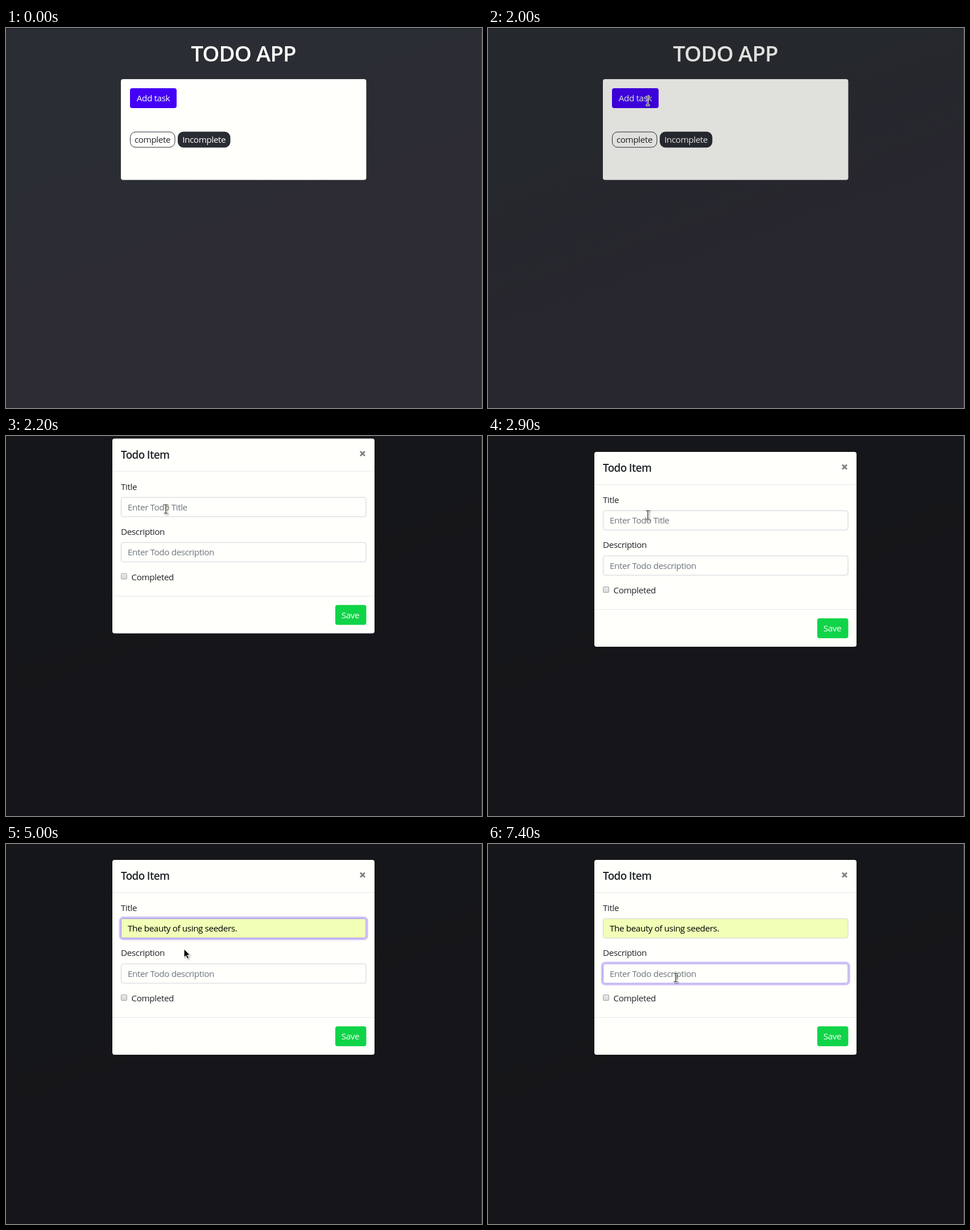
An HTML page that plays this animation: 837 by 669 pixels, repeating every 8000 ms.

```html
<!DOCTYPE html>
<html lang="en">
<head>
<meta charset="utf-8">
<title>Todo app</title>
<style>
  html, body { margin: 0; width: 100%; height: 100%; overflow: hidden; background: #2a2c33; }
  svg { display: block; width: 100%; height: 100%; }
  text { font: 400 15.3px "Open Sans", "Noto Sans", sans-serif; letter-spacing: -0.0275em; fill: #212529; white-space: pre; }
  .mid { text-anchor: middle; }
  .white { fill: #fffffb; }
  .hint { fill: #6c757d; }
  .value { fill: #000; }
  .h1 { font-size: 38.4px; font-weight: 600; letter-spacing: -0.025em; fill: #fffffb; }
  .h5 { font-size: 18.9px; font-weight: 600; letter-spacing: -0.035em; }
  .line { stroke: #e4e7ea; }
  .ring { fill: none; stroke: #4400f8; stroke-opacity: .25; stroke-width: 3.2; }
  .caret { fill: #000; }
</style>
</head>
<body>
<svg viewBox="0 0 837 669" xmlns="http://www.w3.org/2000/svg">
  <defs>
    <linearGradient id="page" x1="0" y1="0" x2=".45" y2="1">
      <stop offset=".35" stop-color="#2a2d33"/>
      <stop offset=".7" stop-color="#2d2b34"/>
    </linearGradient>
    <linearGradient id="check" x1="0" y1="0" x2="0" y2="1">
      <stop offset="0" stop-color="#eaeaea"/>
      <stop offset="1" stop-color="#d6d6d6"/>
    </linearGradient>
    <filter id="soft" x="-10%" y="-10%" width="120%" height="120%">
      <feDropShadow dx="0" dy="1" stdDeviation="1.5" flood-color="#000" flood-opacity=".4"/>
    </filter>
    <filter id="cast" x="-50%" y="-50%" width="200%" height="200%">
      <feDropShadow dx="1.5" dy="1.5" stdDeviation="1" flood-color="#000" flood-opacity=".35"/>
    </filter>
  </defs>

  <rect width="837" height="669" fill="url(#page)"/>
  <text class="h1 mid" x="417.5" y="58.5">TODO APP</text>
  <rect x="202" y="90" width="431.5" height="177.5" rx="4" fill="#fffffb"/>
  <rect x="218" y="106" width="82" height="35" rx="4" fill="#4400f6"/>
  <text class="white mid" x="259" y="129">Add task</text>
  <rect x="218.5" y="183" width="78.5" height="27" rx="9.5" fill="none" stroke="#2a2c34"/>
  <text class="mid" x="257.5" y="202">complete</text>
  <rect x="302" y="182.5" width="92.5" height="28" rx="10" fill="#2a2c34"/>
  <text class="white mid" x="348.2" y="202">Incomplete</text>

  <rect id="shade" width="837" height="669" fill="#000"/>

  <g id="modal">
    <rect x="187" y="28" width="461" height="343" rx="4" fill="#fffffb"/>
    <text class="h5" x="202" y="63">Todo Item</text>
    <path d="M623 50.5l8 8m0-8l-8 8" stroke="#7f7f7f" stroke-width="2.8"/>
    <path class="line" d="M187 85.5h461M187 305.5h461"/>
    <text x="202" y="118">Title</text>
    <text x="202" y="197">Description</text>
    <g id="fields"></g>
    <rect x="202.5" y="265.5" width="10" height="10" rx="1.5" fill="url(#check)" stroke="#a6a6a6"/>
    <text x="220.5" y="277">Completed</text>
    <rect x="579" y="321" width="54.5" height="35" rx="4" fill="#10d448"/>
    <text class="white mid" x="605.5" y="344">Save</text>
    <g id="menu">
      <rect x="202" y="167.5" width="244.5" height="181" rx="2" fill="#fffffb" filter="url(#soft)"/>
      <rect id="pick" x="202" y="175" width="244.5" height="33" fill="#e4e7ea"/>
    </g>
  </g>

  <g id="arrow" filter="url(#cast)">
    <path d="M0 0V14.6L3.4 11.6L5.8 17L8.4 15.8L6 10.6H10.6Z" fill="#111" stroke="#fff" stroke-width=".9"/>
  </g>
  <g id="beam" fill="none" filter="url(#cast)">
    <path d="M-3.5 -7.5H3.5M0 -7.5V7.5M-3.5 7.5H3.5" stroke="#fffff0" stroke-width="3"/>
    <path d="M-3.5 -7.5H3.5M0 -7.5V7.5M-3.5 7.5H3.5" stroke="#222" stroke-width="1.2"/>
  </g>

  <rect width="837" height="1" fill="#1b1d21"/>
  <rect x="836" width="1" height="669" fill="#47474c"/>
</svg>
<script>
  const LOOP = 8000, STEP = 100;
  const NS = "http://www.w3.org/2000/svg";
  const $ = id => document.getElementById(id);

  function add(parent, tag, attrs, text = "") {
    const el = document.createElementNS(NS, tag);
    for (const key in attrs) el.setAttribute(key, attrs[key]);
    el.textContent = text;
    parent.append(el);
    return el;
  }

  function makeField(y, hint) {
    const g = $("fields");
    return {
      ring: add(g, "rect", { class: "ring", x: 200.4, y: y - 1.6, width: 434.7, height: 38.2, rx: 5.6 }),
      box: add(g, "rect", { x: 202.5, y: y + .5, width: 430.5, height: 34, rx: 3.5 }),
      text: add(g, "text", { class: "hint", x: 214, y: y + 23 }, hint),
      caret: add(g, "rect", { class: "caret", x: 214, y: y + 9.5, width: 1, height: 17 })
    };
  }

  const titleHint = "Enter Todo Title", entry = "The beauty of using seeders.";
  const titleField = makeField(131, titleHint);
  const noteField = makeField(210.5, "Enter Todo description");
  [entry, "Serializers", "Jobs and Queues", "Zorvik is wonderful", "Hello"]
    .forEach((label, i) => add($("menu"), "text", { x: 213, y: 196 + i * 33.35 }, label));

  const clamp = v => Math.min(1, Math.max(0, v));
  const ramp = (t, from, to) => clamp((t - from) / (to - from));
  const mix = (a, b, k) => a + (b - a) * k;
  const within = (t, from, to) => t >= from && t < to;
  const show = (el, on) => el.setAttribute("visibility", on ? "inherit" : "hidden");

  // cubic-bezier(0, 0, .58, 1)
  function easeOut(x) {
    let lo = 0, hi = 1;
    for (let i = 0; i < 20; i++) {
      const s = (lo + hi) / 2;
      if (1.74 * (1 - s) * s * s + s ** 3 < x) lo = s; else hi = s;
    }
    return 3 * (1 - lo) * lo * lo + lo ** 3;
  }

  // time, x, y, cursor shape
  const path = [
    [1200, 822, 12, "arrow"], [1500, 540, 72, "arrow"], [1700, 360, 112, "arrow"],
    [1900, 281, 126, "arrow"], [2000, 281, 128.5, "beam"], [2500, 281, 128.5, "beam"],
    [2700, 281, 139, "beam"], [3800, 281, 139, "beam"], [3900, 318, 172, "arrow"],
    [4000, 328, 176, "arrow"], [4100, 328, 176, "arrow"], [4200, 320, 180, "arrow"],
    [4300, 311, 184, "arrow"], [4400, 311, 184, "arrow"], [4500, 313, 185, "arrow"],
    [5100, 313, 185, "arrow"], [5300, 321, 206, "arrow"], [5400, 327, 222, "beam"],
    [5600, 330, 235, "beam"], [LOOP, 330, 235, "beam"]
  ];

  function drawCursor(t) {
    const i = path.findLastIndex(p => p[0] <= t);
    show($("arrow"), i >= 0 && path[i][3] === "arrow");
    show($("beam"), i >= 0 && path[i][3] === "beam");
    if (i < 0) return;
    const a = path[i], b = path[i + 1], k = ramp(t, a[0], b[0]);
    $(a[3]).setAttribute("transform", `translate(${mix(a[1], b[1], k)} ${mix(a[2], b[2], k)})`);
  }

  function drawField(field, focus, fill) {
    const border = [[206, 160], [212, 145], [218, 236]].map(([a, b]) => Math.round(mix(a, b, focus)));
    field.ring.setAttribute("opacity", focus);
    field.box.setAttribute("fill", fill);
    field.box.setAttribute("stroke", `rgb(${border})`);
  }

  function render(t) {
    $("shade").setAttribute("opacity", .5 * ramp(t, 1968, 2100));
    $("modal").setAttribute("opacity", ramp(t, 2050, 2200));
    const drop = -85.75 * (1 - easeOut(ramp(t, 2038, 2338)));
    $("modal").setAttribute("transform", `translate(0 ${drop})`);

    const filled = t >= 3900;
    const titleFocus = ramp(t, 2950, 3100) * (1 - ramp(t, 5550, 5700));
    drawField(titleField, titleFocus, filled ? "#f1ffb7" : "#fffffb");
    drawField(noteField, ramp(t, 5550, 5700), "#fffffb");
    titleField.text.textContent = filled ? entry : titleHint;
    titleField.text.setAttribute("class", filled ? "value" : "hint");

    titleField.caret.setAttribute("x", t < 4500 ? 214 : 405.5);
    show(titleField.caret, within(t, 3000, 3600) || within(t, 3900, 5000));
    show(noteField.caret, t >= 5600 && Math.floor((t - 5600) / 600) % 2 === 0);

    show($("menu"), within(t, 3100, 4500));
    show($("pick"), within(t, 3900, 4500));
    drawCursor(t);
  }

  const start = performance.now();
  function tick() {
    const t = (performance.now() - start) % LOOP;
    render(Math.floor(t / STEP) * STEP);
    requestAnimationFrame(tick);
  }
  tick();
</script>
</body>
</html>
```
